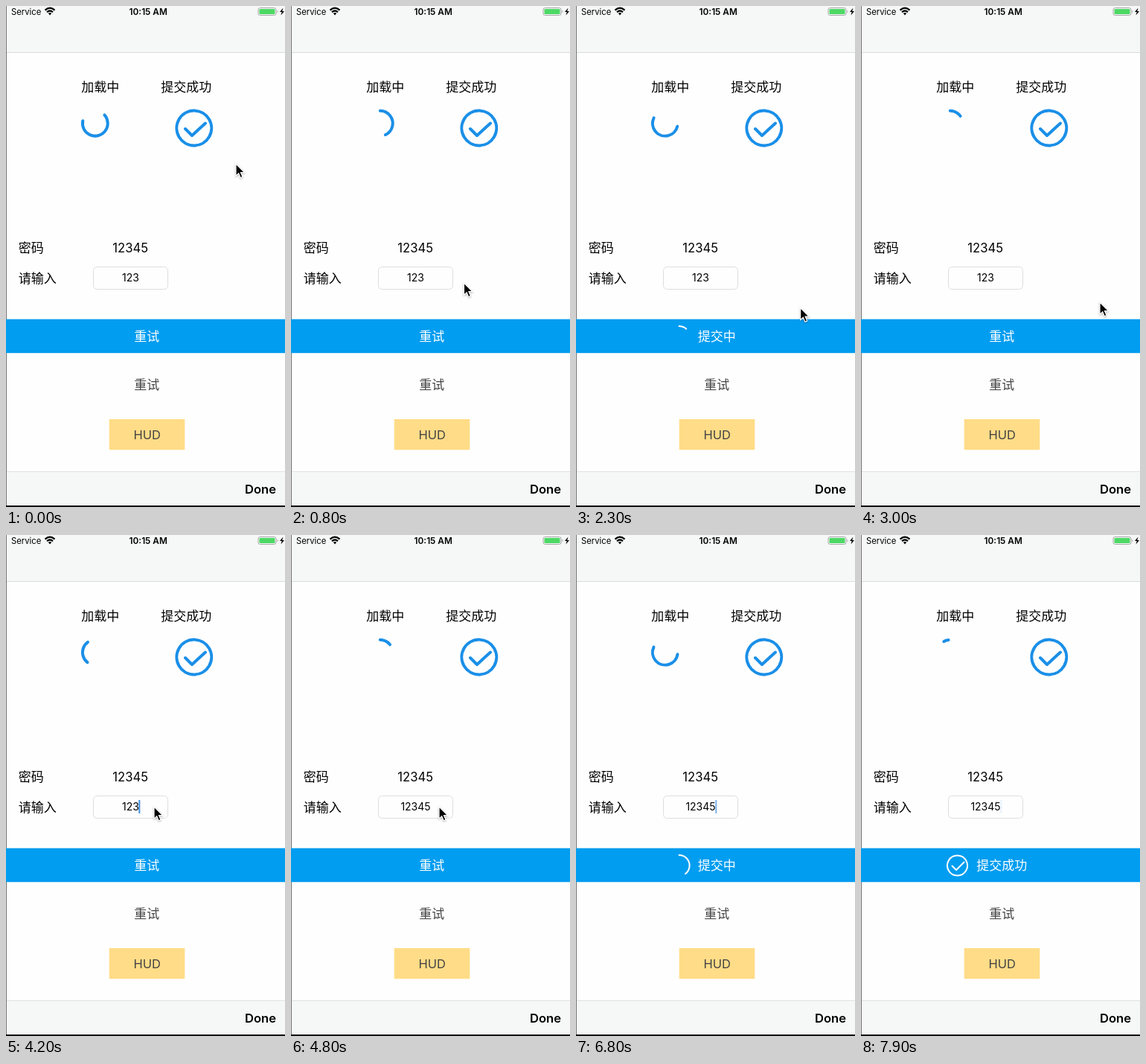
These frames come from a looping animation (375 px wide and 673 px high, 8 s). An HTML page:

```html
<!DOCTYPE html>
<html lang="zh">
<head>
<meta charset="utf-8">
<style>
  html, body { margin: 0; width: 100%; height: 100%; overflow: hidden; background: #fefefe; }
  svg { display: block; width: 375px; height: 673px; }
  text { font-family: Inter, "Noto Sans CJK SC", "Noto Sans CJK", sans-serif; font-size: 17px; }
  .mid { text-anchor: middle; }
  .line { fill: none; stroke-linecap: round; stroke-linejoin: round; }
  .blue { stroke: #1a8fe8; stroke-width: 4; }
  .white { stroke: #fff; stroke-width: 2; }
  #cursor { filter: drop-shadow(0 1px 1px rgba(0, 0, 0, .3)); }
</style>
</head>
<body>
<svg viewBox="0 0 375 673">
  <rect width="375" height="673" fill="#fefefe"/>
  <rect width="375" height="62" fill="#f6f7f7"/>
  <rect y="62" width="375" height="1" fill="#d9dcdc"/>
  <rect y="625" width="375" height="1" fill="#e0e3e3"/>
  <rect y="626" width="375" height="45" fill="#f6f7f7"/>
  <rect width="1" height="673" fill="#777"/>

  <text x="7" y="12" style="font-size:11.3px">Service</text>
  <g fill="none" stroke="#000" stroke-width="2.2">
    <path d="M52.5 5.6Q59 -.2 65.5 5.6M55 8.3Q59 4.7 63 8.3"/>
    <path d="M56.8 9.8Q59 8.2 61.2 9.8L59 12.4Z" fill="#000" stroke="none"/>
  </g>
  <text class="mid" x="191.2" y="12" style="font-size:11.8px;font-weight:600">10:15 AM</text>
  <rect x="339" y="2.5" width="24" height="10" rx="2.5" fill="none" stroke="#a5a8a8"/>
  <rect x="340.5" y="4" width="21" height="7" rx="1" fill="#4cd964"/>
  <path d="M364.5 5.5q2 2 0 4z" fill="#a5a8a8"/>
  <path d="M372.5 2.5L368 8h2.7L369.5 12.5L374 7h-2.8z"/>

  <text x="101.3" y="114.5">加载中</text>
  <text x="208.3" y="114.5">提交成功</text>
  <path id="loader" class="line blue"/>
  <path id="ring" class="line blue"/>
  <path id="tick" class="line blue" d="M241 165L250 174L268 157.5" pathLength="1"/>

  <text x="16.8" y="330.5">密码</text>
  <text class="mid" x="167.2" y="330.5" style="font-size:16.6px">12345</text>
  <text x="16.8" y="371.5">请输入</text>
  <rect x="117.5" y="350.5" width="100" height="30" rx="5" fill="#fefefe" stroke="#dedede"/>
  <text id="field" class="mid" x="167.5" y="370.3" style="font-size:14px"></text>
  <rect id="caret" y="356" width="2" height="18" fill="#2a84dc"/>

  <rect y="420.7" width="375" height="45.5" fill="#009df0"/>
  <text id="label" class="mid" x="189.2" y="450" fill="#fff"></text>
  <path id="spinner" class="line white"/>
  <path id="doneRing" class="line white"/>
  <path id="doneTick" class="line white" d="M122.5 444.5L128 450L138.5 439.5" pathLength="1"/>

  <text class="mid" x="189.2" y="514.5" fill="#444">重试</text>
  <rect x="138.7" y="555" width="101.6" height="41.2" fill="#ffdc87"/>
  <text class="mid" x="189.8" y="582" fill="#444" style="font-size:16.5px">HUD</text>
  <text class="mid" x="342" y="655" style="font-size:16.6px;font-weight:600">Done</text>

  <rect y="671" width="375" height="2"/>
  <path id="cursor" d="M0 0V16.2L3.7 12.8L6.2 18.8L9 17.6L6.5 11.7H11.5Z" stroke="#fff" stroke-width="1.2"/>
</svg>
<script>
const LOOP = 8000, STEP = 100, SPIN = 450.4;
const el = id => document.getElementById(id);
const clamp = v => Math.max(0, Math.min(1, v));

// Arc between two fractions of a turn, clockwise from the top.
function arc(id, cx, cy, r, from, to) {
  if (to - from < 0.001) return el(id).setAttribute('d', '');
  const point = f => {
    const a = f * 2 * Math.PI;
    return `${cx + r * Math.sin(a)} ${cy - r * Math.cos(a)}`;
  };
  const seg = f => `A${r} ${r} 0 0 1 ${point(f)}`;
  const mid = k => from + (to - from) * k / 3;
  el(id).setAttribute('d', `M${point(from)}${seg(mid(1))}${seg(mid(2))}${seg(to)}`);
}

// The head runs fast to three quarters, then the tail catches up slowly.
function spin(id, cx, cy, r, phase) {
  const p = phase - Math.floor(phase), grow = 0.31;
  const tail = clamp((p - grow) / (1 - grow));
  const head = p < grow ? 0.75 * p / grow : 0.75 + 0.25 * tail;
  arc(id, cx, cy, r, tail, head);
}

function drawTick(id, k) {
  const node = el(id);
  node.style.display = k > 0 ? '' : 'none';
  node.setAttribute('stroke-dasharray', k < 1 ? `${k} 2` : 'none');
}

function success(ringId, tickId, cx, cy, r, age) {
  arc(ringId, cx, cy, r, 0, clamp(age / 186));
  drawTick(tickId, clamp((age - 100) / 100));
}

const path = [
  [0, 309, 212], [300, 309, 212], [1100, 197, 446], [1700, 197, 446],
  [2500, 321, 398], [3200, 321, 398], [3900, 199, 365], [4800, 199, 365],
  [5100, 197, 446], [5300, 197, 446], [5600, 308, 402], [6000, 390, 392], [LOOP, 390, 392]
];

function moveCursor(t) {
  const i = path.findIndex(k => k[0] > t);
  const [t0, x0, y0] = path[i - 1], [t1, x1, y1] = path[i];
  const k = (t - t0) / (t1 - t0), e = k * k * (3 - 2 * k);
  el('cursor').setAttribute('transform', `translate(${x0 + (x1 - x0) * e} ${y0 + (y1 - y0) * e})`);
}

function render(t) {
  spin('loader', 119.8, 157.7, 16.9, 0.402 + t / SPIN);

  const replay = t >= 5473 ? 5473 : t >= 1375 ? 1375 : -LOOP;
  success('ring', 'tick', 252.8, 164, 23.4, t - replay);

  const typed = t < 4500 ? 3 : t < 4700 ? 4 : 5;
  el('field').textContent = '12345'.slice(0, typed);
  el('caret').setAttribute('x', 178.3 + (typed - 3) * 4.5);
  const blink = 0.5 + 1.6 * Math.cos(2 * Math.PI * ((t - 4200) / 373 - 0.21));
  el('caret').setAttribute('opacity', t < 4100 ? 0 : clamp(blink));

  const start = t >= 6276 ? 6276 : t >= 5230 ? 5230 : 1377;
  const busy = (t >= 1377 && t < 2500) || (t >= 5230 && t < 7400);
  const done = t >= 7400;
  el('label').textContent = done ? '提交成功' : busy ? '提交中' : '重试';
  spin('spinner', 138.6, 444, 14, busy ? (t - start) / SPIN : 0);
  success('doneRing', 'doneTick', 129.5, 444, 13.5, done ? t - 7400 : 0);

  moveCursor(t);
}

const origin = performance.now();
function frame() {
  const t = performance.now() - origin;
  render(Math.floor(t / STEP) * STEP % LOOP);
  requestAnimationFrame(frame);
}
frame();
</script>
</body>
</html>
```
